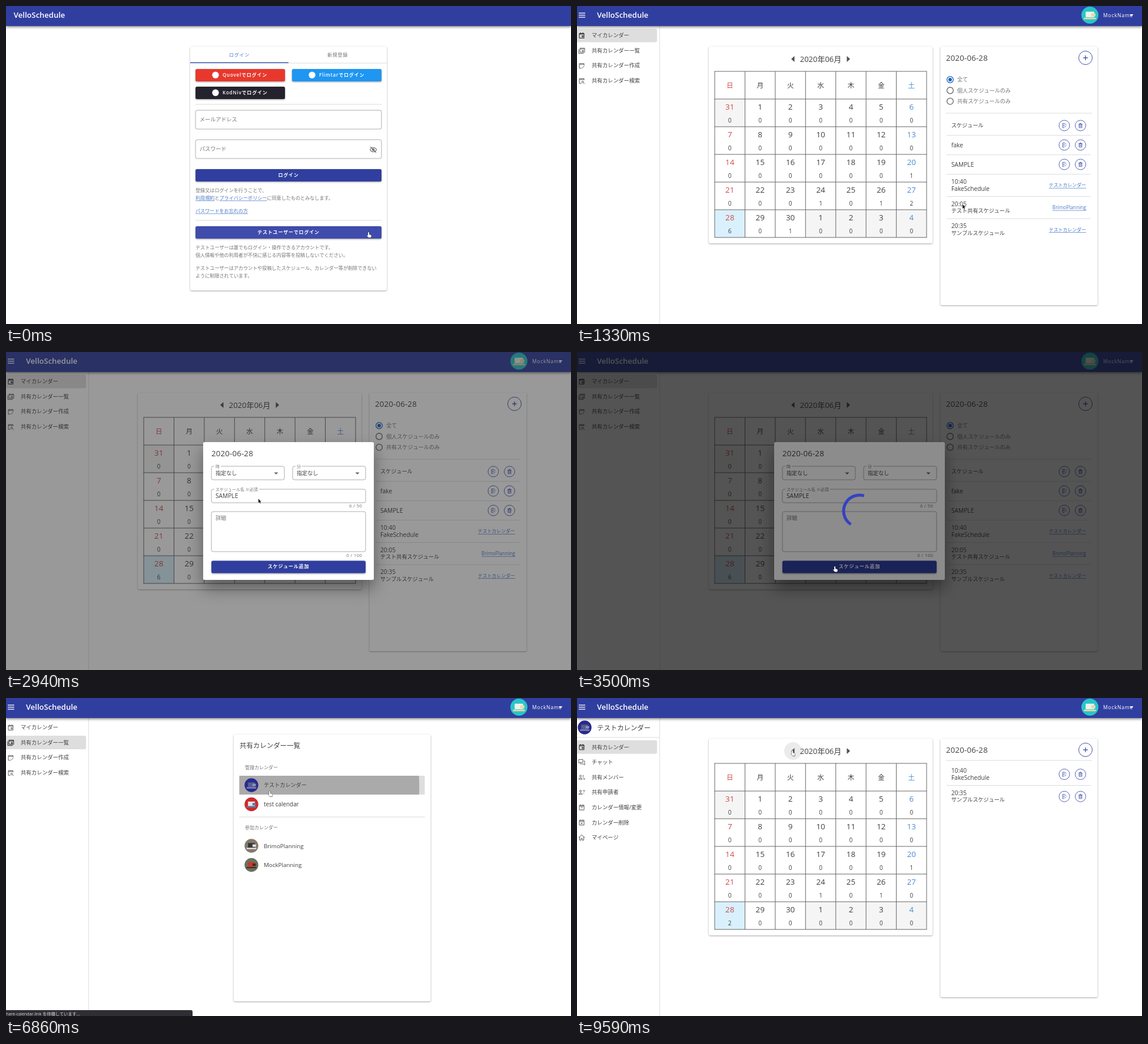
An HTML page with a canvas that plays this animation: 960 by 540 pixels, repeating every 9.66 s.

```html
<!DOCTYPE html>
<html lang="ja">
<head>
<meta charset="utf-8">
<title>Calendar demo</title>
<style>
html, body { margin: 0; width: 100%; height: 100%; overflow: hidden; background: #fff; }
canvas { display: block; }
</style>
</head>
<body>
<canvas id="stage" width="960" height="540"></canvas>
<script>
const ctx = document.getElementById('stage').getContext('2d');
const LOOP = 9660;
const INDIGO = '#303f9f', LINK = '#4a78c8', INK = '#404040', MUTED = '#757575', LINE = '#dcdcdc';
const BRAND = 'VelloSchedule', USER = 'MockName';
const MINE = 'テストカレンダー', JOINED = 'BrimoPlanning';

const clamp = v => Math.max(0, Math.min(1, v));
const ramp = (t, start, length) => clamp((t - start) / length);
const smooth = p => p * p * (3 - 2 * p);
const easeOut = p => 1 - (1 - p) ** 2;
const between = (t, a, b) => t >= a && t < b;

// ---------- drawing helpers ----------
function text(str, x, y, size = 9.1, color = INK, { align = 'left', weight = 400, spacing = 0 } = {}) {
  ctx.font = `${weight} ${size}px "Open Sans", "Noto Sans CJK JP", "Noto Sans CJK", sans-serif`;
  ctx.textAlign = align;
  ctx.letterSpacing = spacing + 'px';
  ctx.fillStyle = color;
  ctx.fillText(str, x, y + size * 0.36);
  return ctx.measureText(str).width;
}
function link(str, x, y, size, align = 'left') {
  const w = text(str, x, y, size, LINK, { align });
  rect(align === 'right' ? x - w : x, y + size * 0.55, w, 0.7, LINK);
  return w;
}
function rect(x, y, w, h, color) {
  ctx.fillStyle = color;
  ctx.fillRect(x, y, w, h);
}
function round(x, y, w, h, r, fill, stroke, lineWidth = 0.8) {
  ctx.beginPath();
  ctx.roundRect(x, y, w, h, r);
  if (fill) { ctx.fillStyle = fill; ctx.fill(); }
  if (stroke) { ctx.strokeStyle = stroke; ctx.lineWidth = lineWidth; ctx.stroke(); }
}
function circle(x, y, r, fill, stroke, lineWidth = 1) {
  round(x - r, y - r, 2 * r, 2 * r, r, fill, stroke, lineWidth);
}
function shadowed(blur, dy, alpha, draw) {
  ctx.save();
  ctx.shadowColor = `rgba(0,0,0,${alpha})`;
  ctx.shadowBlur = blur;
  ctx.shadowOffsetY = dy;
  draw();
  ctx.restore();
}
const hline = (x1, x2, y, color = LINE) => rect(x1, y - 0.5, x2 - x1, 1, color);
const card = (x, y, w, h) => shadowed(3, 1, 0.35, () => round(x, y, w, h, 2.5, '#fff'));

function button(str, x, y, w, color, cx = x + w / 2, align = 'center') {
  shadowed(3, 1, 0.4, () => round(x, y, w, 21, 2.5, color));
  text(str, cx, y + 10, 8, '#fff', { align, weight: 600, spacing: 0.8 });
}
function field(x, y, w, h, label) {
  round(x, y, w, h, 3, null, '#9a9a9a');
  if (!label) return;
  ctx.font = '7px "Noto Sans CJK JP", sans-serif';
  ctx.letterSpacing = '0px';
  rect(x + 5, y - 1, ctx.measureText(label).width + 4, 2, '#fff');
  text(label, x + 7, y, 7, MUTED);
}
function triangle(color, ...p) {
  ctx.beginPath();
  ctx.moveTo(p[0], p[1]);
  ctx.lineTo(p[2], p[3]);
  ctx.lineTo(p[4], p[5]);
  ctx.fillStyle = color;
  ctx.fill();
}

// Icons are stroked on a 24 unit grid.
const CAL = 'M4 5h16v16H4zM4 8h16M8 2v4M16 2v4';
const HEAD = 'M5 8a3 3 0 1 0 6 0a3 3 0 1 0-6 0M2 19c0-6 12-6 12 0z';
const ICONS = {
  day: CAL + 'M13 13h4v4h-4z',
  stack: 'M6 4h16v14H6zM6 7h16M2 8v14h17M14 12h4v3h-4z',
  edit: 'M20 11V5H4v16h7M4 8h16M13 21l8-8',
  search: 'M20 10V5H4v16h7M4 8h16M12 16a3 3 0 1 0 6 0a3 3 0 1 0-6 0M17 18l5 5',
  chat: 'M2 3h14v10H5l-3 3zM19 8h3v14l-4-4H7v-3',
  people: HEAD + 'M15 5a3 3 0 0 1 0 6M17 14c3 1 5 2 5 5h-4',
  request: HEAD + 'M17 8c0-4 5-4 5-1s-3 2-3 5M19 15v2',
  info: CAL + 'M10 12c0-2 4-2 4 0s-2 1-2 3M12 17v2',
  remove: CAL + 'M9 12l6 6M15 12l-6 6',
  home: 'M2 12L12 3l10 9M5 10v11h5v-6h4v6h5V10',
  file: 'M19 10V8l-5-5H5v18h6M13 20l7-7M8 10h6M8 14h4',
  trash: 'M6 7h12v14H6zM4 6h16M9 3h6M10 11v6M14 11v6',
  hidden: 'M2 12c5-9 15-9 20 0c-5 9-15 9-20 0M9 12a3 3 0 1 0 6 0a3 3 0 1 0-6 0M3 3l18 18',
  hand: 'M8 12V3a2 2 0 0 1 4 0v7l6 1.5a3 3 0 0 1 2 3l-1 7H10l-6-7c0-2 2-2.5 4-.5z',
  arrow: 'M8 3v17l4-4 3 6 2.5-1-3-6h5z'
};
function icon(name, x, y, color, scale = 0.5, fill) {
  const path = new Path2D(ICONS[name]);
  ctx.save();
  ctx.translate(x - 12 * scale, y - 12 * scale);
  ctx.scale(scale, scale);
  ctx.strokeStyle = color;
  ctx.lineWidth = 2;
  ctx.stroke(path);
  if (fill) { ctx.fillStyle = fill; ctx.fill(path); }
  ctx.restore();
}
function avatar(x, y, r, back, screen, accent) {
  circle(x, y, r, back);
  rect(x - r * 0.5, y - r * 0.4, r, r * 0.65, screen);
  rect(x - r * 0.7, y + r * 0.3, r * 1.4, r * 0.18, accent);
  rect(x + r * 0.15, y - r * 0.2, r * 0.5, r * 0.35, accent);
}
const calendarAvatar = (x, y, r) => avatar(x, y, r, '#2a2a8e', '#52618f', '#8d93b8');

// ---------- shared chrome ----------
function header(loggedIn) {
  shadowed(4, 1.5, 0.45, () => rect(0, 0, 960, 34, INDIGO));
  text(BRAND, loggedIn ? 34 : 13, 15.5, 13, '#fff', { weight: 600 });
  if (!loggedIn) return;
  for (const y of [12, 15.5, 19]) rect(3, y - 0.6, 11, 1.3, '#fff');
  avatar(871.5, 15.5, 14.5, '#28c5c8', '#eef3ea', '#e8d9a8');
  text(USER, 894, 15.5, 8.5, '#fff', { spacing: 0.7 });
  triangle('#fff', 939, 14, 945.5, 14, 942.2, 17.5);
}
function drawer(items, top, selected) {
  rect(140, 34, 1, 506, '#e0e0e0');
  items.forEach(([name, label], i) => {
    const y = top + i * 25.6;
    if (i === selected) round(-4, y - 11.5, 140, 23, 3, '#dedede');
    icon(name, 8, y, i === selected ? '#222' : '#606060');
    text(label, 25, y);
  });
}
const MY_MENU = [['day', 'マイカレンダー'], ['stack', '共有カレンダー一覧'],
  ['edit', '共有カレンダー作成'], ['search', '共有カレンダー検索']];
const SHARED_MENU = [['day', '共有カレンダー'], ['chat', 'チャット'], ['people', '共有メンバー'],
  ['request', '共有申請者'], ['info', 'カレンダー情報/変更'], ['remove', 'カレンダー削除'], ['home', 'マイページ']];

// ---------- pages ----------
function loginPage() {
  card(313, 69, 334, 414);
  hline(313, 647, 97);
  text('ログイン', 396.5, 83, 8, LINK, { align: 'center', spacing: 0.7 });
  text('新規登録', 563.5, 83, 8, MUTED, { align: 'center', spacing: 0.8 });
  rect(313, 95.5, 167, 1.5, '#3f5fb0');
  [['Quovel', 322, 107, '#e8382d'], ['Flimtar', 486, 107, '#1e96f2'], ['KodNiv', 322, 137, '#24232d']]
    .forEach(([name, x, y, color]) => {
      button(name + 'でログイン', x, y, 152, color, x + 46, 'left');
      circle(x + 34, y + 10.3, 5.7, '#fff');
    });
  hline(322, 638, 167);
  field(322, 177, 316, 32);
  text('メールアドレス', 329, 193, 9.1, MUTED);
  field(322, 227, 316, 32);
  text('パスワード', 329, 243, 9.1, MUTED);
  icon('hidden', 624, 244, '#606060', 0.55);
  button('ログイン', 322, 277, 316, INDIGO);
  const small = (str, x, y) => text(str, x, y, 8.1, MUTED);
  small('登録又はログインを行うことで、', 322, 313.5);
  let x = 322 + link('利用規約', 322, 326, 8.1);
  x += small('と', x, 326);
  x += link('プライバシーポリシー', x, 326, 8.1);
  small('に同意したものとみなします。', x, 326);
  link('パスワードをお忘れの方', 322, 348, 8.1);
  hline(322, 638, 364);
  button('テストユーザーでログイン', 322, 374, 316, '#3f4cac');
  small('テストユーザーは誰でもログイン・操作できるアカウントです。', 322, 410.5);
  small('個人情報や他の利用者が不快に感じる内容等を投稿しないでください。', 322, 423);
  small('テストユーザーはアカウントや投稿したスケジュール、カレンダー等が削除できない', 322, 445.5);
  small('ように制限されています。', 322, 458);
}

function calendar(month, counts, hover) {
  const first = new Date(2020, month - 1, 1).getDay();
  const rows = Math.ceil((first + new Date(2020, month, 0).getDate()) / 7);
  const colX = c => 234 + c * 360 / 7;
  const tint = c => c === 0 ? '#d04a48' : c === 6 ? '#4a8bd4' : INK;
  const center = { align: 'center' };
  card(224, 69, 380, 99 + rows * 47);
  if (hover) circle(hover < 0 ? 367 : 461, 90, 15, '#ebebeb');
  triangle('#505050', 364, 90, 369.5, 85, 369.5, 95);
  triangle('#505050', 464, 90, 458.5, 85, 458.5, 95);
  text(`2020年0${month}月`, 414, 90, 13, INK, center);

  for (let i = 0; i < rows * 7; i++) {
    const date = new Date(2020, month - 1, 1 - first + i);
    const key = (date.getMonth() + 1) * 100 + date.getDate();
    const c = i % 7, y = 158 + 47 * Math.floor(i / 7);
    const other = date.getMonth() !== month - 1;
    rect(colX(c), y, 360 / 7, 47, key === 628 ? '#d9f1fc' : other ? '#f5f5f5' : '#fff');
    text(String(date.getDate()), colX(c + 0.5), y + 13, 13.3, tint(c), center);
    text(String(counts[key] || 0), colX(c + 0.5), y + 36, 10, INK, center);
  }
  [...'日月火水木金土'].forEach((d, c) => text(d, colX(c + 0.5), 135, 11.4, tint(c), center));
  for (let r = 0; r <= rows + 1; r++) hline(233.5, 594.5, 111 + r * 47, '#686868');
  for (let c = 0; c <= 7; c++) rect(colX(c) - 0.5, 111, 1, 47 * (rows + 1), '#686868');
}

function actions(y) {
  [['file', 828], ['trash', 855.5]].forEach(([name, x]) => {
    circle(x, y, 9, null, INDIGO, 0.8);
    icon(name, x, y, INDIGO, 0.4);
  });
}
function schedulePanel(items, top, plusHover) {
  card(617.5, 69, 267, 439);
  text('2020-06-28', 627, 88, 13.3, INK, { spacing: 0.15 });
  circle(864, 88, 11.5, plusHover ? '#cfd3ec' : null, INDIGO, 0.9);
  rect(860, 87.4, 8, 1.2, INDIGO);
  rect(863.4, 84, 1.2, 8, INDIGO);
  hline(627, 875, top);
  let y = top + 4.7;
  items.forEach(({ time, name, from }, i) => {
    const h = time ? 37.7 : 33, mid = y + h / 2 - (time ? 0 : 0.2);
    const size = /^[ -~]+$/.test(name) ? 10.2 : 9.1;
    if (i) hline(628, 873, y);
    if (time) text(time, 636, mid - 6.3, 10.2);
    text(name, 636, time ? mid + 5.8 : mid, size);
    if (from) link(from, 865, mid, from === MINE ? 7.9 : 8.3, 'right');
    else actions(mid);
    y += h;
  });
}

const SHARED_ITEMS = [
  { time: '10:40', name: 'FakeSchedule', from: MINE },
  { time: '20:05', name: 'テスト共有スケジュール', from: JOINED },
  { time: '20:35', name: 'サンプルスケジュール', from: MINE }
];
const SHARED_COUNTS = { 620: 1, 624: 1, 626: 1 };

function myPage(t) {
  const loaded = t >= 1120, filter = t < 4470 ? 0 : t < 4970 ? 1 : 2;
  const own = ['スケジュール', 'fake', 'SAMPLE'].map(name => ({ name }));
  if (t >= 3990) own.unshift({ name: 'SAMPLE' });
  const items = !loaded ? [] : [...(filter < 2 ? own : []), ...(filter !== 1 ? SHARED_ITEMS : [])];
  const counts = !loaded ? {} : {
    ...(filter < 2 ? { 627: 2, 630: 1 } : {}),
    ...(filter !== 1 ? SHARED_COUNTS : {}),
    628: items.length
  };
  drawer(MY_MENU, 50, 0);
  calendar(6, counts, 0);
  schedulePanel(items, 182, between(t, 1820, 2180));
  ['全て', '個人スケジュールのみ', '共有スケジュールのみ'].forEach((label, i) => {
    const y = 125 + i * 18.4, on = i === filter;
    circle(634, y, 5.4, null, on ? '#1a62bd' : '#666', 1.3);
    if (on) circle(634, y, 3, '#1a62bd');
    text(label, 646, y, 9.1, MUTED);
  });
}

function listPage(t) {
  drawer(MY_MENU, 50, 1);
  card(387, 62, 334.5, 453);
  text('共有カレンダー一覧', 397, 81, 11.45);
  text('管理カレンダー', 406, 118, 8, MUTED);
  if (t >= 6560) {
    ctx.save();
    ctx.beginPath();
    ctx.rect(396.5, 132, 315, 32);
    ctx.clip();
    rect(396, 132, 316, 32, '#dedede');
    const p = ramp(t, 6670, 404);
    if (p > 0) circle(449.5, 150, 350 * easeOut(p), '#aaaaaa');
    ctx.restore();
  }
  calendarAvatar(417, 148, 11.7);
  avatar(417, 180.5, 11.7, '#cb2b2c', '#e9e4e6', '#5879a8');
  avatar(417, 251, 11.7, '#85796c', '#34373c', '#e8e8e6');
  avatar(417, 283.5, 11.7, '#6c705f', '#c33b2d', '#4a2a25');
  text(MINE, 438, 148);
  text('test calendar', 438, 180.5, 9.9);
  hline(396, 712, 202);
  text('参加カレンダー', 406, 220, 8, MUTED);
  text(JOINED, 438, 251, 9.8);
  text('MockPlanning', 438, 283.5, 9.8);
}

function sharedPage(t) {
  const month = between(t, 7900, 8300) || between(t, 8850, 9250) ? 7 : between(t, 8300, 8850) ? 8 : 6;
  const loaded = t >= 7280;
  calendarAvatar(13, 50, 11.7);
  text(MINE, 34, 50.5, 11.4);
  hline(0, 140, 67);
  drawer(SHARED_MENU, 83.3, 0);
  calendar(month, loaded ? { ...SHARED_COUNTS, 628: 2 } : {}, between(t, 7720, 8460) ? 1 : t > 8700 ? -1 : 0);
  const items = SHARED_ITEMS.filter(i => i.from === MINE).map(({ time, name }) => ({ time, name }));
  schedulePanel(loaded ? items : [], 106, false);
}

// ---------- layers above the page ----------
function dialog(t) {
  const shown = easeOut(ramp(t, 1971, 140)) * (1 - ramp(t, 3780, 140));
  if (!shown) return;
  rect(0, 0, 960, 540, `rgba(33,33,33,${0.46 * shown})`);
  const typed = 'SAMPLE'.slice(0, Math.floor(6 * ramp(t, 2560, 320)));
  const active = t >= 2500;
  ctx.save();
  ctx.globalAlpha = shown;
  ctx.translate(480, 270);
  ctx.scale(0.5 + shown / 2, 0.5 + shown / 2);
  ctx.translate(-480, -270);
  shadowed(28, 14, 0.4, () => round(335, 153, 290, 234, 2.5, '#fff'));
  text('2020-06-28', 349, 172, 13.3, INK, { spacing: 0.15 });
  [[349, '時'], [487, '分']].forEach(([x, label]) => {
    field(x, 194, 124, 23, label);
    text('指定なし', x + 7, 206);
    triangle('#666', x + 106.5, 204.5, x + 113.5, 204.5, x + 110, 208);
  });
  const label = 'スケジュール名 ※必須';
  field(349, 233, 262, 23, active && label);
  if (active) text(typed, 356, 244, 10.2);
  else text(label, 356, 244, 9.1, MUTED);
  const right = { align: 'right', spacing: 0.2 };
  text(typed.length + ' / 50', 605, 261.5, 8, MUTED, right);
  field(349, 271, 262, 68);
  text('詳細', 356, 282, 9.1, MUTED);
  text('0 / 100', 605, 345, 8, MUTED, right);
  button('スケジュール追加', 349, 354.5, 262, INDIGO);
  ctx.restore();
}

function loader(t, start, end) {
  const shown = ramp(t, start, 90) * (1 - ramp(t, end, 90));
  if (!shown) return;
  rect(0, 0, 960, 540, `rgba(0,0,0,${0.45 * shown})`);
  const phase = (t - start) / 700 % 1;
  const half = smooth(phase * 2 % 1), growing = phase < 0.5;
  const tail = growing ? 15 * half : 15 + 110 * half;
  const length = growing ? 1 + 99 * half : Math.min(100, 125.7 - tail);
  const unit = 2 * Math.PI / 125.7, from = 2 * Math.PI * phase + tail * unit;
  ctx.save();
  ctx.globalAlpha = shown;
  ctx.beginPath();
  ctx.arc(480, 270, 27, from, from + length * unit);
  ctx.strokeStyle = '#3542c0';
  ctx.lineWidth = 5;
  ctx.stroke();
  ctx.restore();
}

function statusBar(t) {
  const shown = Math.max(ramp(t, 400, 60) * (1 - ramp(t, 930, 130)), ramp(t, 6730, 60) * (1 - ramp(t, 7060, 130)));
  if (!shown) return;
  ctx.save();
  ctx.globalAlpha = shown;
  round(-4, 530, 321, 14, 3, '#2f2e35');
  text('hare-calendar.link を待機しています...', 0, 536.5, 7.2, '#d8d8d8');
  ctx.restore();
}

// time, x, y of the pointer
const POINTER = [[0, 617, 389], [1150, 617, 389], [1850, 857, 99], [2130, 857, 99], [2450, 430, 246],
  [2900, 430, 246], [3180, 439, 369], [3750, 439, 369], [4350, 655, 148], [4520, 655, 148], [4760, 668, 167],
  [5480, 668, 167], [6060, 62, 80], [6220, 62, 80], [6600, 449, 163], [7250, 449, 163], [7750, 461, 95],
  [8400, 461, 95], [8740, 367, 94], [LOOP, 367, 94]];
const HAND_TIMES = [[0, 650], [3120, 3850], [4270, 5560], [6000, 6240], [6560, 7000], [7710, 8460], [8690, LOOP]];

function pointer(t) {
  const i = POINTER.findIndex(p => p[0] > t);
  const [t0, x0, y0] = POINTER[i - 1], [t1, x1, y1] = POINTER[i];
  const p = smooth((t - t0) / (t1 - t0));
  const x = x0 + (x1 - x0) * p, y = y0 + (y1 - y0) * p;
  if (HAND_TIMES.some(([a, b]) => between(t, a, b))) icon('hand', x, y, '#222', 0.46, '#fff');
  else icon('arrow', x, y, '#fff', 0.42, '#111');
}

function render(t) {
  rect(0, 0, 960, 540, '#fff');
  if (t < 690) loginPage();
  else if (t < 6230) myPage(t);
  else if (t < 6980) listPage(t);
  else sharedPage(t);
  if (between(t, 4060, 5300)) {
    rect(141, 34, 819, 23, INDIGO);
    text('スケジュールを追加しました', 554, 45.5, 9.1, '#fff', { align: 'center' });
  }
  header(t >= 690);
  dialog(t);
  loader(t, 833, 1130);
  loader(t, 3310, 3780);
  loader(t, 6990, 7300);
  statusBar(t);
  pointer(t);
}

function tick() {
  render(performance.now() % LOOP);
  requestAnimationFrame(tick);
}
tick();
</script>
</body>
</html>
```
